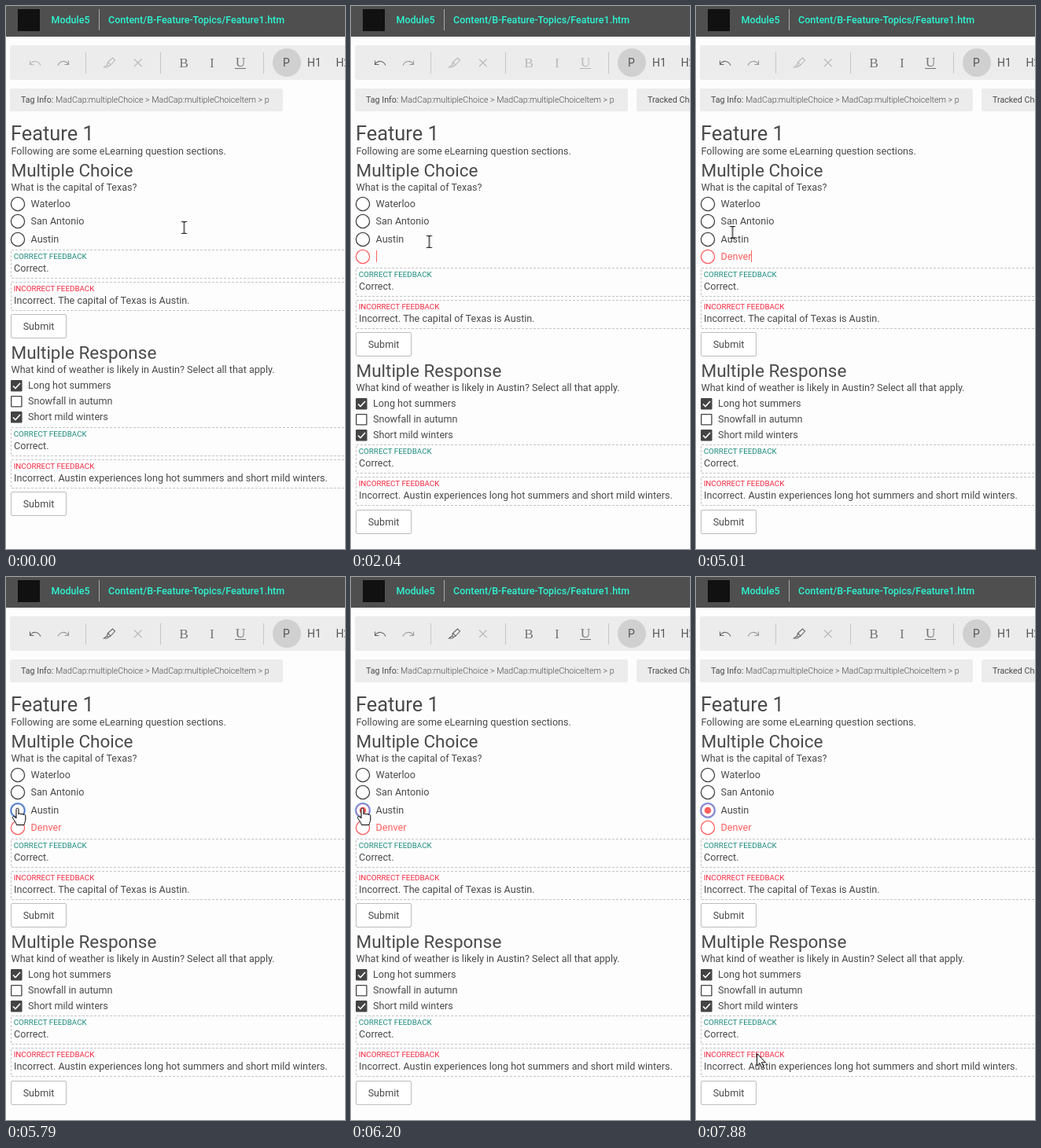
Animation, 431 px wide and 691 px high, one loop 8 s. Source, as an HTML page:

```html
<!DOCTYPE html>
<html lang="en">
<head>
<meta charset="utf-8">
<title>Quiz editor</title>
<style>
  html, body { margin: 0; width: 100%; height: 100%; overflow: hidden; background: #fdfdfd; }
  svg { display: block; width: 431px; height: 691px; font: 12.6px Roboto, sans-serif; fill: #4a4a4a; }
  .line { fill: none; stroke: #444; }
  .h1 { font-size: 25.4px; }
  .h2 { font-size: 22.5px; }
  .head { font-size: 12.5px; font-weight: 500; fill: #2cf5d2; }
  .tag { font-size: 10.7px; font-weight: 300; }
  .regular { font-weight: 400; }
  .style { font-size: 14px; fill: #555; }
  .label { font-size: 9.8px; }
  .good { fill: #1a8a7c; }
  .bad { fill: #f5263f; }
  .panel { fill: #ececec; }
  .dash { fill: none; stroke: #c4c4c4; stroke-dasharray: 3 2; }
  .button { fill: #fff; stroke: #bdbdbd; }
  .radio { fill: #fff; stroke: #444; stroke-width: 1.3; }
  .icon { fill: none; stroke: currentColor; stroke-width: 1.1; }
  .serif { font: 17.5px "Liberation Serif", serif; fill: currentColor; text-anchor: middle; }
  .new { fill: #ff5f5f; }
  .new .radio, #picked .radio { stroke: #ff5f5f; }
  .pale { color: #b9b9b9; }
  .pointer { fill: #fff; stroke: #000; stroke-linejoin: round; }
</style>
</head>
<body>
<svg viewBox="0 0 431 691">
  <rect width="431" height="39" fill="#4f4f4f"/>
  <rect x="15" y="4" width="28" height="28" fill="#111"/>
  <path d="M118.5 4V31" stroke="#ababab"/>
  <text class="head" x="57.5" y="22">Module5</text>
  <text class="head" x="130" y="22">Content/B-Feature-Topics/Feature1.htm</text>

  <path class="panel" d="M431 50H8q-3 0-3 3V91q0 3 3 3H431z"/>
  <path d="M101.5 59V86M196.5 59V86M327.5 59V86" stroke="#c6c6c6"/>
  <g id="undo" class="pale"><path class="icon" d="M30.5 69.5v5h5M31 74C34 69 41 69 44 75.5"/></g>
  <path class="icon" color="#999" d="M79.5 69.5v5h-5M79 74C76 69 69 69 66 75.5"/>
  <g id="marker" class="pale"><path class="icon" d="M129.5 71.5l6-5.5 3 3-5.5 6zM129.5 71.5l-1 3.5 2 1.5 2.5-1.5M128.5 75l-4 3h4l2-1.5"/></g>
  <path class="icon pale" d="M163 67.5l9.5 9.5M172.5 67.5l-9.5 9.5"/>
  <g id="format" color="#777">
    <text class="serif" x="226" y="78">B</text>
    <text class="serif" x="262" y="78" font-style="italic">I</text>
    <text class="serif" x="298" y="77">U</text>
    <path class="icon" d="M291 79.5h14"/>
  </g>
  <circle cx="357" cy="72" r="18" fill="#d0d0d0"/>
  <text class="style" x="352" y="77">P</text>
  <text class="style" x="383" y="77">H1</text>
  <text class="style" x="419.5" y="77">H2</text>

  <rect class="panel" x="5" y="105" width="347" height="29" rx="2"/>
  <text class="tag" x="19" y="123"><tspan class="regular">Tag Info:</tspan> MadCap:multipleChoice &gt; MadCap:multipleChoiceItem &gt; p</text>
  <g id="tracked">
    <rect class="panel" x="363" y="105" width="80" height="29" rx="2"/>
    <text class="tag regular" x="377" y="123">Tracked Changes</text>
  </g>

  <text class="h1" x="6" y="171">Feature 1</text>
  <text x="6.5" y="189">Following are some eLearning question sections.</text>
  <text class="h2" x="6.5" y="217">Multiple Choice</text>
  <text x="6.5" y="235">What is the capital of Texas?</text>
  <g id="choices"></g>
  <g id="upper"></g>
  <g id="lower"></g>
  <g id="last"></g>
  <path id="caretA" class="line" d="M67.5 289V304"/>
  <path id="caretB" d="M.5 311V326" stroke="#ff5f5f"/>

  <g id="cursor">
    <path id="beam" d="M-3.5-7.5H-1L0-6.5 1-7.5H3.5M0-6.5V6.5M-3.5 7.5H-1L0 6.5 1 7.5H3.5" fill="none" stroke="#111" stroke-width="1.2"/>
    <path id="hand" class="pointer" d="M-2 13V1.5C-2-.3 1-.3 1 1.5V8c0-1.6 3-1.4 3 .3 0-1.4 3-1.2 3 .6 0-1.2 2.8-1 2.8 1V15c0 2-1.6 3.5-1.8 6.5H-1.5C-2 18.5-5.5 15-6.5 12.5-7.2 10.8-5 10-4 11.2L-2 13z"/>
    <path id="arrow" class="pointer" d="M.5.5V16L4 12.6 6.6 18.5 9 17.5 6.4 11.8H11.4z"/>
  </g>
</svg>
<script>
const LOOP = 8000;
const $ = id => document.getElementById(id);

const choice = (y, text) =>
  `<circle class="radio" cx="15" cy="${y}" r="8.6"/><text x="31.5" y="${y + 4}">${text}</text>`;

const feedback = (y, kind, label, text) =>
  `<path class="dash" d="M440 ${y + .5}H6.5V${y + 36.5}H440"/>
   <text class="label ${kind}" x="9.7" y="${y + 12}">${label} FEEDBACK</text>
   <text x="10" y="${y + 28}">${text}</text>`;

const answers = (y, wrong) =>
  feedback(y, 'good', 'CORRECT', 'Correct.') +
  feedback(y + 41, 'bad', 'INCORRECT', 'Incorrect. ' + wrong);

const submit = y =>
  `<rect class="button" x="6.5" y="${y + .5}" width="70" height="30" rx="1.5"/>
   <text x="41.5" y="${y + 20}" text-anchor="middle">Submit</text>`;

const check = (y, on, text) =>
  `<rect x="6.7" y="${y + .7}" width="13.2" height="13.2" rx=".5" fill="${on ? '#444' : '#fff'}" stroke="#444" stroke-width="1.3"/>
   ${on ? `<path d="M9 ${y + 7.5}l3 3 6-6.5" fill="none" stroke="#fff" stroke-width="1.6"/>` : ''}
   <text x="28" y="${y + 11}">${text}</text>`;

$('choices').innerHTML =
  choice(252, 'Waterloo') + choice(274, 'San Antonio') + choice(297, 'Austin') +
  `<g id="added" class="new">${choice(319, [...'Denver'].map(c => `<tspan class="key">${c}</tspan>`).join(''))}</g>
   <g id="picked"><circle class="radio" cx="15" cy="297" r="8.6"/><circle cx="15" cy="297" r="4.3" fill="#ff5f5f"/></g>
   <circle id="focus" cx="15" cy="297" r="9" fill="none" stroke="#4d90fe" stroke-width="2.6" opacity=".6"/>`;

$('upper').innerHTML =
  answers(310, 'The capital of Texas is Austin.') + submit(392) +
  `<text class="h2" x="6.5" y="449">Multiple Response</text>
   <text x="6.5" y="467">What kind of weather is likely in Austin? Select all that apply.</text>` +
  check(476, true, 'Long hot summers') + check(496, false, 'Snowfall in autumn') +
  check(516, true, 'Short mild winters');

$('lower').innerHTML =
  answers(536, 'Austin experiences long hot summers and short mild winters.');

$('last').innerHTML = submit(618);

// Holds each value from its time until the next one.
function hold(el, prop, steps) {
  el.animate(
    steps.map(([t, value]) => ({ offset: t / LOOP, [prop]: value, easing: 'steps(1, end)' })),
    { duration: LOOP, iterations: Infinity });
}

// Hidden at first, then toggled at every given time.
function toggle(el, ...times) {
  hold(el, 'visibility', [0, ...times].map((t, i) => [t, i % 2 ? 'visible' : 'hidden']));
}

const move = (x, y) => `translate(${x}px, ${y}px)`;
const addedAt = 2040;
const shift = (id, dy) => hold($(id), 'transform', [[0, move(0, 0)], [addedAt, move(0, dy)]]);

shift('upper', 23);
shift('lower', 22);
shift('last', 23);

hold($('undo'), 'color', [[0, '#b9b9b9'], [addedAt, '#666']]);
hold($('format'), 'color', [[0, '#777'], [addedAt, '#b9b9b9'], [2830, '#777']]);
hold($('marker'), 'color', [[0, '#b9b9b9'], [5660, '#666']]);
toggle($('tracked'), addedAt, 5660, 6050);

toggle($('added'), addedAt);
toggle($('focus'), 5660);
toggle($('picked'), 5930);
toggle($('caretA'), 910, 1490);
toggle($('caretB'), addedAt, 2580, 2700, 4150, 4570, 5140);

const keyTimes = [2700, 2980, 3110, 3240, 3490, 3610];
const caretX = [39, 46, 53, 59, 65, 70];
document.querySelectorAll('.key').forEach((key, i) => toggle(key, keyTimes[i]));
hold($('caretB'), 'transform', [[0, move(32, 0)], ...keyTimes.map((t, i) => [t, move(caretX[i], 0)])]);

const track = [
  [0, 'beam', 226.5, 282],
  [310, 'beam', 218.5, 282],
  [430, 'beam', 190.5, 284],
  [550, 'beam', 156.5, 289],
  [670, 'beam', 125.5, 295],
  [790, 'beam', 105.5, 300],
  [910, 'beam', 99.5, 301],
  [1070, 'beam', 99.5, 300],
  [4860, 'beam', 75.5, 293],
  [5010, 'beam', 46.5, 288],
  [5140, 'beam', 22.5, 287],
  [5280, 'hand', 14, 291],
  [5400, 'hand', 15, 294],
  [6470, 'hand', 17, 302],
  [6590, 'arrow', 23, 331],
  [6720, 'beam', 42.5, 391],
  [6840, 'beam', 65.5, 452],
  [6970, 'beam', 89.5, 505],
  [7090, 'beam', 103.5, 535],
  [7230, 'beam', 110.5, 584],
  [7370, 'beam', 117.5, 603],
  [7490, 'beam', 112.5, 615],
  [7610, 'beam', 94.5, 623],
  [7730, 'beam', 81.5, 624],
  [7880, 'arrow', 77, 606]
];
hold($('cursor'), 'transform', track.map(([t, , x, y]) => [t, move(x, y)]));
for (const kind of ['beam', 'hand', 'arrow'])
  hold($(kind), 'visibility', track.map(([t, k]) => [t, k === kind ? 'visible' : 'hidden']));
</script>
</body>
</html>
```
